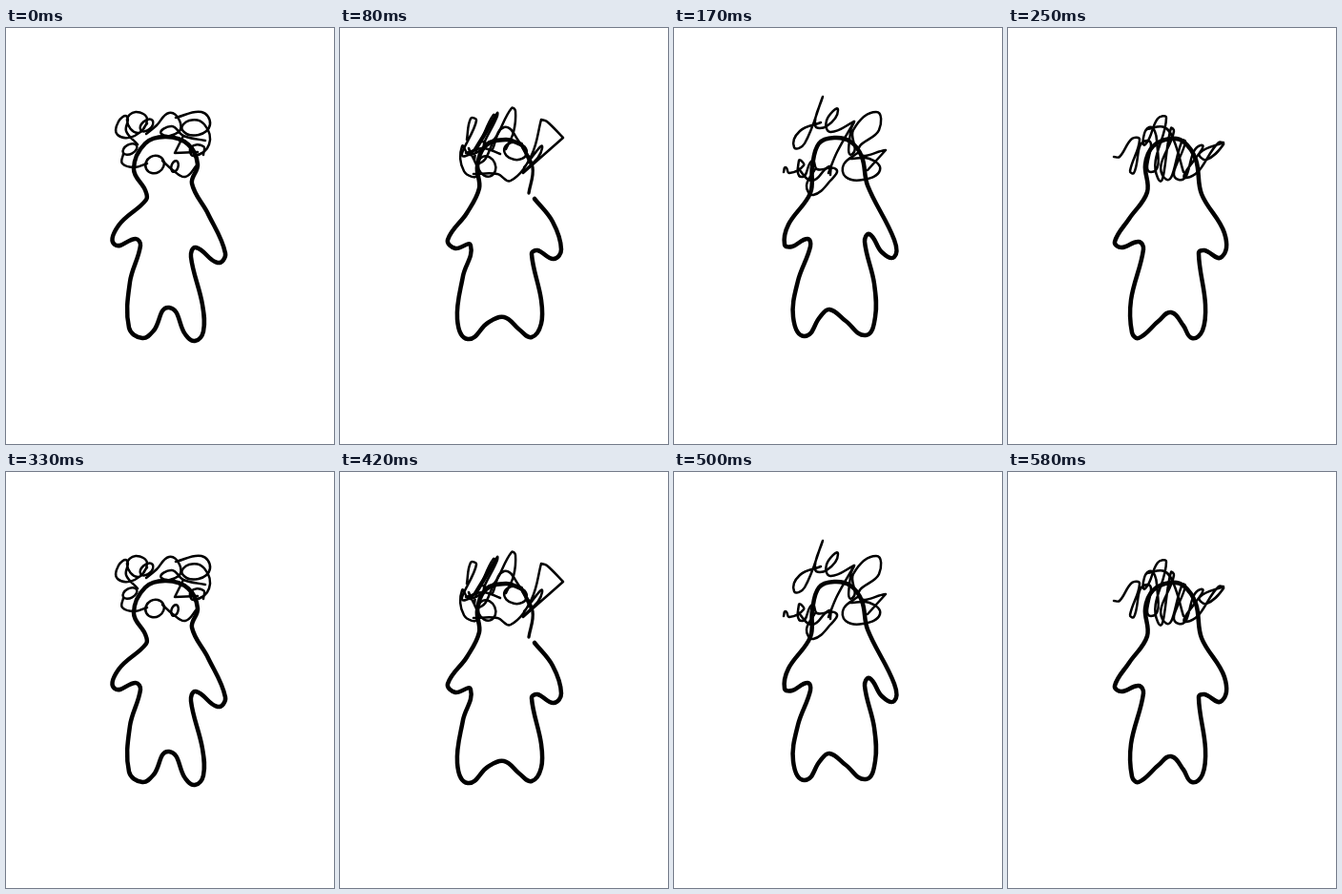
Recreate the animation shown at these times as an HTML page with a canvas. Size 344x436 px, loop 660 ms.

```html
<!DOCTYPE html>
<html lang="en">
<head>
<meta charset="utf-8">
<title>Scribble hair</title>
<style>
html, body { margin: 0; width: 100%; height: 100%; overflow: hidden; background: #fff; }
canvas { display: block; width: 344px; height: 436px; }
</style>
</head>
<body>
<canvas id="stage"></canvas>
<script>
const W = 344, H = 436, LOOP = 660;
const BODY = 4.5, HAIR = 2.5;
const ctx = document.getElementById('stage').getContext('2d');
const ratio = window.devicePixelRatio || 1;
ctx.canvas.width = W * ratio;
ctx.canvas.height = H * ratio;

// Smooth pen line through "x,y" points; a repeated point makes a corner.
function pen(width, text, closed = false) {
  const pts = text.trim().split(/\s+/).map(p => p.split(',').map(Number));
  const n = pts.length;
  const at = i => closed ? pts[(i + n) % n] : pts[Math.max(0, Math.min(n - 1, i))];
  const dir = i => {
    const a = at(i - 1), b = at(i + 1);
    const len = Math.hypot(b[0] - a[0], b[1] - a[1]) || 1;
    return [(b[0] - a[0]) / len, (b[1] - a[1]) / len];
  };
  ctx.lineWidth = width;
  ctx.beginPath();
  ctx.moveTo(...pts[0]);
  for (let i = 0; i < (closed ? n : n - 1); i++) {
    const b = at(i), c = at(i + 1), u = dir(i), v = dir(i + 1);
    const k = Math.hypot(c[0] - b[0], c[1] - b[1]) * 0.36;
    ctx.bezierCurveTo(b[0] + u[0] * k, b[1] + u[1] * k, c[0] - v[0] * k, c[1] - v[1] * k, ...c);
  }
  if (closed) ctx.closePath();
  ctx.stroke();
}

const body = (text, closed = true) => pen(BODY, text, closed);
const hair = text => pen(HAIR, text);

function loop(x, y, rx, ry, tilt = 0) {
  ctx.lineWidth = HAIR;
  ctx.beginPath();
  ctx.ellipse(x, y, rx, ry, tilt, 0, Math.PI * 2);
  ctx.stroke();
}

function curly() {
  body(`168,114 191,122 201,143 195,163 212,195 230,236 222,246 199,230 194,240
    206,290 207,318 198,328 188,321 171,293 155,317 143,325 129,314 130,266 141,228
    136,221 114,227 118,207 147,180 146,170 134,148 146,121`);
  loop(147.5, 102, 8, 5, -0.7);
  loop(130, 127, 8, 5, -0.5);
  loop(156, 143, 10, 9, -0.5);
  hair('148,100 138,110 127,97 136,88 148,96 135,113 117,112 118,98 127,93 126,108 138,122');
  hair('123,132 122,142 135,146 148,142');
  hair('147,111 158,102 171,89 182,97 181,109 163,111 174,103 186,113 209,118');
  hair('178,94 205,88 214,101 202,112 185,107 192,97 208,101 213,122 197,134 194,125 207,124 207,133');
  hair('186,113 177,131 177,131 201,130');
  hair('164,139 175,149 188,156 200,144');
  loop(177, 145, 3.5, 6, 0.3);
}

function spiky() {
  pen(3.3, '198,173 202,146 190,122');
  body(`190,122 174,117 153,123 144,145 146,168 133,194 113,222 121,231 137,228
    129,260 123,305 134,326 155,309 172,303 188,316 201,324 211,310 211,285 201,237
    207,233 224,242 232,232 223,203 204,179`, false);
  hair('133,117 137,95 143,97 132,134 161,91 163,93 144,126');
  hair('138,132 165,89 165,92 154,123 180,84 184,87 182,109 174,127');
  hair('162,117 145,142 146,120 153,122 136,133 128,124 130,150 144,154 135,126');
  loop(154, 145, 9, 11, -0.4);
  loop(184, 129, 12, 9, 0.2);
  hair('132,131 150,126 168,132');
  hair('140,153 165,153 179,160 201,133 211,96 211,96 217,98 234,115 234,115 192,152 192,152 212,126 193,146');
  hair('160,127 172,104 187,118 200,143');
}

function letters() {
  body(`168,115 152,121 145,145 143,173 120,206 116,227 124,229 140,221 143,229
    130,265 125,303 137,323 153,303 163,295 180,307 201,322 211,303 210,268 200,224
    205,216 218,235 231,240 231,222 203,165 197,135 185,119`);
  hair(`154,99 132,108 126,125 137,121 156,72 156,72 148,102 160,103 172,86
    160,97 164,109 189,98 189,98 171,130 162,152`);
  hair('189,98 185,109 187,132 188,107 212,88 215,107 194,130 222,128 222,128 203,149');
  hair('194,130 178,143 180,156 198,159 216,149 205,137 184,137');
  hair(`115,151 117,146 121,152 136,144 131,139 134,156 145,139 150,148 170,148
    164,160 146,175 139,165 148,148`);
  hair('130,147 145,160 163,145 164,154');
}

function waves() {
  body(`170,116 152,124 144,143 146,172 127,200 112,224 119,230 137,224 142,232
    129,285 130,319 137,325 158,307 171,298 184,312 193,325 204,317 207,290 200,236
    206,233 224,240 227,215 203,174 197,138 184,119`);
  hair(`111,135 117,135 130,116 138,117 128,150 132,152 146,118 150,151 156,118
    148,104 144,122 157,95 166,94 157,157 171,105 174,108 164,157 183,118 186,119
    179,159 202,123 187,157 221,120 226,122 208,138 201,131 226,120`);
  hair('146,106 164,104 174,118 184,151');
}

const poses = [curly, spiky, letters, waves];
const starts = [0, 80, 170, 250, 330, 420, 500, 580];

function render() {
  const t = performance.now() % LOOP;
  const step = starts.filter(s => s <= t).length - 1;
  ctx.setTransform(ratio, 0, 0, ratio, 0, 0);
  ctx.fillStyle = '#fff';
  ctx.fillRect(0, 0, W, H);
  ctx.strokeStyle = '#000';
  ctx.lineCap = ctx.lineJoin = 'round';
  poses[step % poses.length]();
  requestAnimationFrame(render);
}
render();
</script>
</body>
</html>
```
